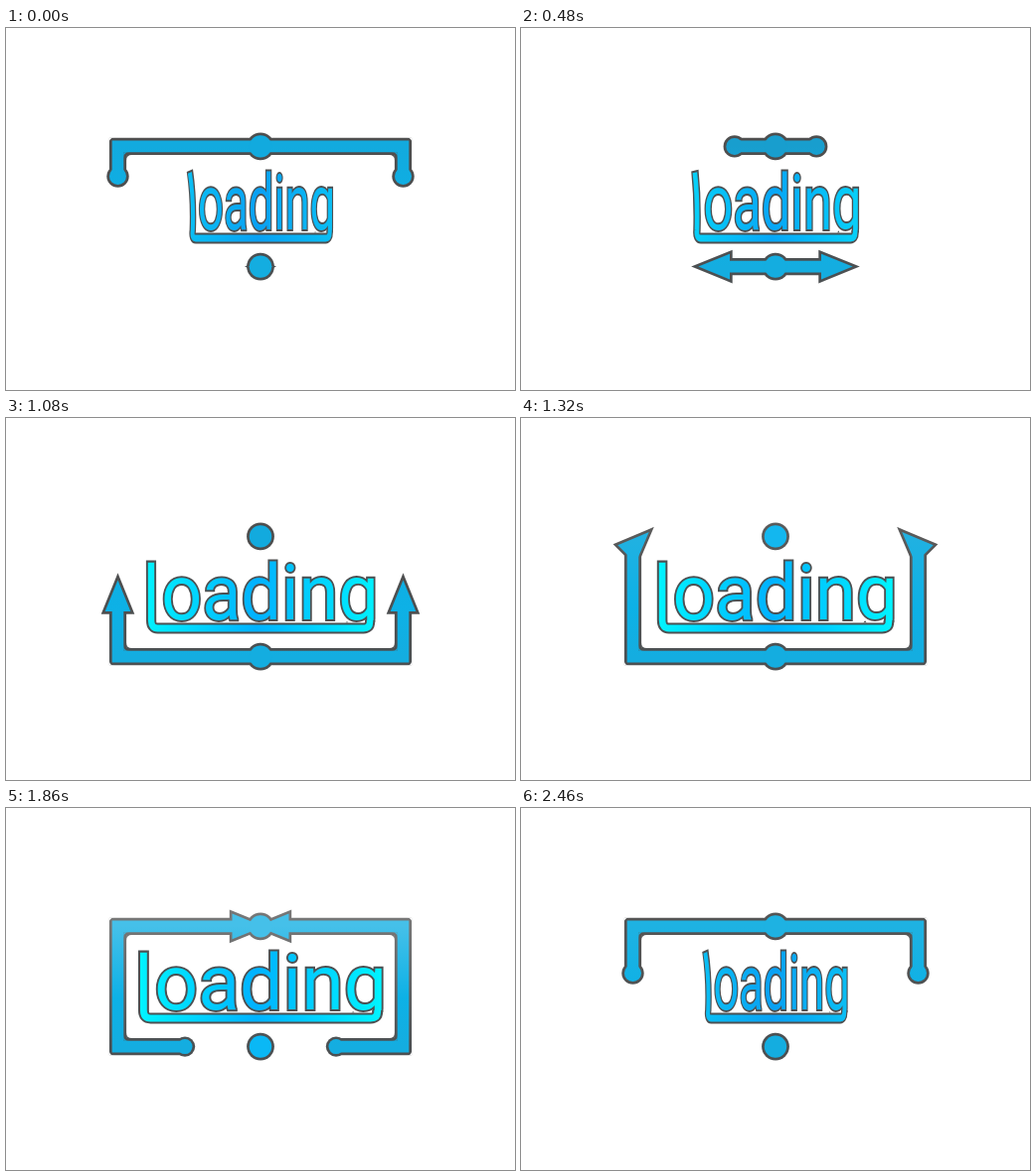
Recreate the animation shown at these times as an HTML page. Size 512 by 365 pixels, loop 2.52 s.

```html
<!DOCTYPE html>
<html lang="en">
<head>
<meta charset="utf-8">
<title>Loading</title>
<style>
html, body { margin: 0; width: 100%; height: 100%; overflow: hidden; background: #fff; }
svg { display: block; }
text { font: 77px Roboto, "Liberation Sans", Arial, sans-serif; paint-order: stroke; }
</style>
</head>
<body>
<svg width="512" height="365" viewBox="0 0 512 365" aria-label="loading">
  <defs>
    <linearGradient id="line" gradientUnits="userSpaceOnUse" x1="0" y1="119" x2="0" y2="240">
      <stop id="lineTop"/><stop offset="1" stop-color="#4c5052"/>
    </linearGradient>
    <linearGradient id="fill" gradientUnits="userSpaceOnUse" x1="0" y1="119" x2="0" y2="240">
      <stop id="fillTop"/><stop offset=".6" stop-color="#0db1e6"/><stop offset="1" stop-color="#14ade0"/>
    </linearGradient>
    <linearGradient id="ink" gradientUnits="userSpaceOnUse" x1="-122" y1="0" x2="122" y2="0">
      <stop class="edge"/><stop class="mid" offset=".48"/><stop class="edge" offset="1"/>
    </linearGradient>
    <clipPath id="above"><rect x="-140" y="130" width="280" height="76.3"/></clipPath>
  </defs>
  <g fill="url(#line)" stroke="url(#line)">
    <g id="dark"></g>
    <use href="#dark" transform="translate(512) scale(-1 1)"/>
    <g stroke="none"><circle cx="256" cy="119.4" r="13.9"/><circle cx="256" cy="240.6" r="13.9"/></g>
  </g>
  <g fill="url(#fill)" stroke="url(#fill)">
    <g id="light"></g>
    <use href="#light" transform="translate(512) scale(-1 1)"/>
    <g stroke="none"><circle id="topBall" cx="256" cy="119.4" r="11.2"/><circle id="lowBall" cx="256" cy="240.6" r="11.2"/></g>
  </g>
  <g id="word">
    <g clip-path="url(#above)">
      <text x="-107.2" y="203.3" fill="url(#ink)" stroke="#4c5052" stroke-width="3.8">oading</text>
    </g>
    <path id="barDark" fill="none" stroke="#4c5052" stroke-width="10.9"/>
    <path id="barLight" fill="none" stroke="url(#ink)" stroke-width="6.8"/>
  </g>
</svg>
<script>
const LOOP = 2520, STEP = 60;
const CX = 256, TOP = 119.4, LOW = 240.6, W = 143.5, H = LOW - TOP;
const C1 = W, C2 = W + H, END = 2 * W + H, TURN = 20;
const $ = id => document.getElementById(id);

const headKeys = [[0, 4], [240, 24], [480, 63], [720, 121], [1080, 206], [1560, 323.5], [1860, 396.7], [1907, END]];
const tailKeys = [[1467, 0], [1560, 18], [1860, 76], [2207, C1], [2460, 217.5], [2520, 234.5], [3000, 367], [3150, END]];
const sizeKeys = [[0, .55], [240, 1], [1890, 1], [2040, 0]];
const widthKeys = [[0, 73], [480, 84], [720, 97], [1080, 115.5], [1560, 121.5], [1860, 123.5], [2460, 72.5], [2520, 73]];
const topKeys = [[0, [18, 170, 222]], [480, [24, 158, 206]], [720, [24, 158, 206]], [1080, [18, 170, 222]],
  [1560, [48, 184, 228]], [1860, [69, 192, 233]], [2460, [30, 178, 226]], [2520, [18, 170, 222]]];
const grayKeys = [[0, 78], [1080, 78], [1860, 118], [2460, 84], [2520, 78]];
const topGlow = [[1080, 0], [1560, 1], [1800, 0]];
const lowGlow = [[1560, 0], [1860, 1], [2400, 0]];

const mix = (a, b, u) => Array.isArray(a) ? a.map((v, i) => mix(v, b[i], u)) : a + (b - a) * u;
const rgb = c => `rgb(${c.map(Math.round)})`;

function track(keys, t) {
  if (t <= keys[0][0]) return keys[0][1];
  for (let i = 1; i < keys.length; i++) {
    const [t0, a] = keys[i - 1], [t1, b] = keys[i];
    if (t <= t1) return mix(a, b, (t - t0) / (t1 - t0));
  }
  return keys[keys.length - 1][1];
}

// Smooth curve through the keys, flat at local extremes
function smooth(keys, t) {
  const slope = i => {
    const p = keys[i - 1], k = keys[i], n = keys[i + 1];
    return !p || !n || (k[1] - p[1]) * (n[1] - k[1]) <= 0 ? 0 : (n[1] - p[1]) / (n[0] - p[0]);
  };
  let i = 0;
  while (i < keys.length - 2 && t > keys[i + 1][0]) i++;
  const [t0, a] = keys[i], [t1, b] = keys[i + 1], d = t1 - t0, u = (t - t0) / d;
  const u2 = u * u, u3 = u2 * u;
  return a * (2 * u3 - 3 * u2 + 1) + b * (3 * u2 - 2 * u3)
    + d * (slope(i) * (u3 - 2 * u2 + u) + slope(i + 1) * (u3 - u2));
}

// Point on the right half of the frame, from bottom centre to top centre
function point(s) {
  if (s <= C1) return [CX + s, LOW];
  if (s <= C2) return [CX + W, LOW - (s - C1)];
  return [CX + W - (s - C2), TOP];
}

// Arrow position and heading, with rounded turns
function pose(s) {
  for (const [c, k] of [[C1, 0], [C2, 1]]) {
    const u = (s - c + TURN) / (2 * TURN);
    if (u > 0 && u < 1) {
      const a = u * Math.PI / 2, p = TURN * Math.sin(a) - TURN, q = TURN - TURN * Math.cos(a);
      return k ? [CX + W - q, TOP - p, -90 - u * 90] : [CX + W + p, LOW - q, -u * 90];
    }
  }
  return [...point(s), s < C1 ? 0 : s < C2 ? -90 : -180];
}

// Rounds a frame corner: inner side for positive half, outer side for negative
function fillet(y, side, half, paint = '') {
  const a = CX + W - half, b = y + side * half, r = 5.5;
  return `<path stroke="none" ${paint} d="M${a - r} ${b}Q${a} ${b} ${a} ${b + side * r}L${a} ${b}Z"/>`;
}

function snake(age, dark) {
  const head = track(headKeys, age), tail = track(tailKeys, age), size = track(sizeKeys, age);
  if (tail >= END) return '';
  const half = dark ? 8.6 : 5.8, end = head >= END ? END : head - 10 * size;
  let out = '';
  if (end > tail && size !== 0 || head >= END) {
    const pts = [tail, ...[C1, C2].filter(c => c > tail && c < end), end].map(point);
    out += `<path fill="none" stroke-width="${half * 2}" d="M${pts.join('L')}"/>`;
    [[C1, LOW, -1], [C2, TOP, 1]].forEach(([c, y, side]) => {
      if (tail > c - 14 || end < c + 14) return;
      out += fillet(y, side, half);
      if (dark) out += fillet(y, side, -half - .2, 'fill="#fff"');
    });
  }
  const [bx, by] = point(tail), r = (tail < 120 ? 10.2 : 11.2) - (dark ? 0 : 2.7);
  out += `<circle stroke="none" cx="${bx}" cy="${by}" r="${r}"/>`;
  if (size > 0) {
    const [x, y, turn] = pose(head);
    // Drawn in place so the vertical shading stays upright
    const a = turn * Math.PI / 180, cos = Math.cos(a) * size, sin = Math.sin(a) * size;
    const pts = [[14.6, 0], [-17, 12.8], [-17, -12.8]].map(([p, q]) => [x + p * cos - q * sin, y + p * sin + q * cos]);
    out += `<path stroke-width="${dark ? 5.4 * size : 0}" stroke-miterlimit="6" d="M${pts.join('L')}Z"/>`;
  }
  return out;
}

function word(t) {
  const w = smooth(widthKeys, t), k = w / 123.5, j = ((1 - k) / .41) ** 2, x = 118, g = 117.3;
  $('word').setAttribute('transform', `translate(256.4) scale(${k} 1)`);
  const bar = y => `M${-x - 3 * j} ${y}Q${-x + 4 * j} 172 ${-x + 2 * j} 204Q${-x} 212 ${-x + 7} 212H${g - 7}Q${g} 212 ${g} 205.5V204`;
  $('barDark').setAttribute('d', bar(143.6));
  $('barLight').setAttribute('d', bar(145.8));
  const u = Math.max(0, Math.min(1, (w - 73) / 46)) ** .75;
  const tint = (name, a, b) => document.querySelectorAll(name).forEach(e => e.setAttribute('stop-color', rgb(mix(a, b, u))));
  tint('.edge', [10, 190, 244], [0, 244, 255]);
  tint('.mid', [10, 160, 242], [0, 178, 255]);
}

function draw(t) {
  const top = track(topKeys, t), g = track(grayKeys, t);
  $('lineTop').setAttribute('stop-color', rgb([g, g, g]));
  $('fillTop').setAttribute('stop-color', rgb(top));
  $('topBall').setAttribute('fill', rgb(mix(top, [4, 188, 252], track(topGlow, t))));
  $('lowBall').setAttribute('fill', rgb(mix([20, 173, 224], [10, 184, 245], track(lowGlow, t))));
  for (const id of ['dark', 'light'])
    $(id).innerHTML = snake(t + LOOP, id === 'dark') + snake(t, id === 'dark');
  word(t);
}

const start = performance.now();
let last = -1;
function tick(now) {
  const t = Math.floor((Math.max(0, now - start) % LOOP) / STEP) * STEP;
  if (t !== last) draw(last = t);
  requestAnimationFrame(tick);
}
tick(start);
</script>
</body>
</html>
```
